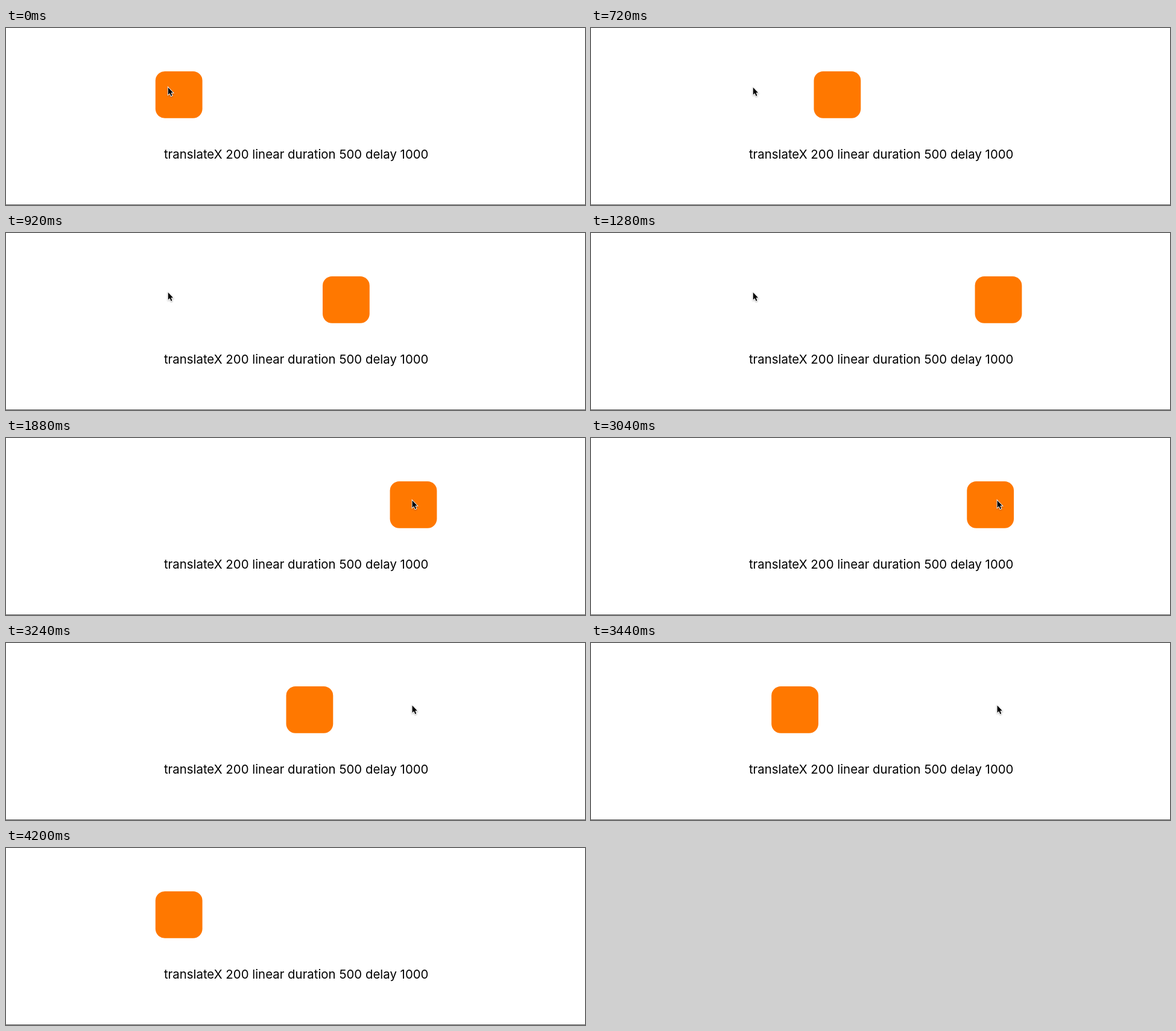
Recreate the animation shown at these times as an HTML page. Size 960 px wide and 294 px high, loop 4240 ms.

```html
<!DOCTYPE html>
<html lang="en">
<head>
<meta charset="utf-8">
<title>translateX</title>
<style>
  html, body { margin: 0; width: 100%; height: 100%; overflow: hidden; background: #fff; }
  svg { display: block; }
  text { font: 20.4px Inter, sans-serif; text-anchor: middle; }
  #cursor { stroke: #fff; stroke-width: 1.8; paint-order: stroke; filter: drop-shadow(0 1px 1px rgba(0, 0, 0, .3)); }
</style>
</head>
<body>
<svg width="960" height="294" viewBox="0 0 960 294">
  <rect y="293" width="960" height="1" fill="#666"/>
  <text x="481.2" y="217">translateX 200 linear duration 500 delay 1000</text>
  <rect id="box" x="247.8" y="72" width="77.8" height="77.8" rx="15.5" fill="#ff7800"/>
  <path id="cursor" d="M0 0V12L2.8 9.4 4.8 14.3 6.7 13.5 4.7 8.7H8.3Z" transform="translate(268.8 98.8)"/>
</svg>
<script>
const LOOP = 4240, STEP = 40;
const box = document.getElementById('box');
const cursor = document.getElementById('cursor');

const smooth = p => p * p * (3 - 2 * p);
const easeIn = p => p * p;
const linear = p => p;

// Keys are [time, value, easing towards this key]
function track(keys, t) {
  let [t0, v0] = keys[0];
  for (const [t1, v1, ease = linear] of keys) {
    if (t < t1) return v0 + (v1 - v0) * ease((t - t0) / (t1 - t0));
    [t0, v0] = [t1, v1];
  }
  return v0;
}

const boxX = [[0, 247.8], [563.5, 247.8], [1063.5, 636.6], [3023, 636.6],
  [3040, 623.3], [3400, 337.5], [3440, 299.2], [3506, 247.8]];
const cursorX = [[0, 268.8], [1400, 268.8], [1860, 673.6, smooth], [3560, 673.6], [3920, 698, easeIn]];
const cursorY = [[0, 98.8], [1400, 98.8], [1860, 103.8, smooth], [3560, 103.8], [3920, -20, easeIn]];

function draw(now) {
  const t = Math.floor(now % LOOP / STEP) * STEP;
  box.setAttribute('x', track(boxX, t));
  cursor.setAttribute('transform', `translate(${track(cursorX, t)} ${track(cursorY, t)})`);
  requestAnimationFrame(draw);
}
requestAnimationFrame(draw);
</script>
</body>
</html>
```
